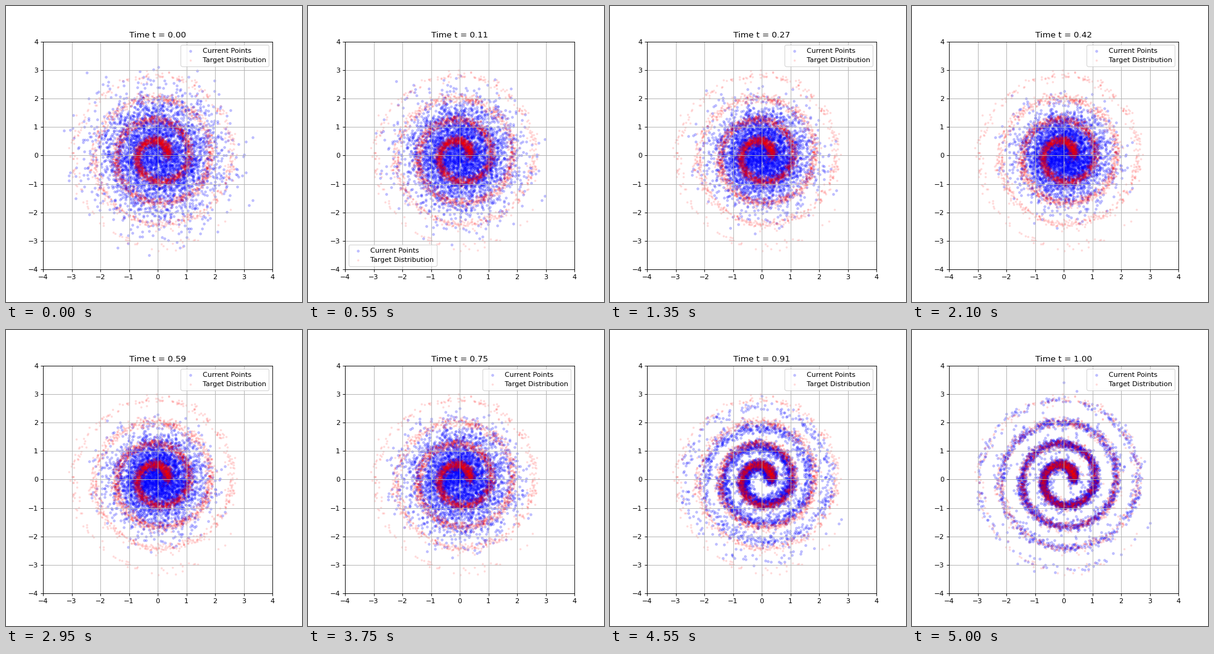
Animation of 480 by 480 pixels, one loop 5.05 s. Source, as a matplotlib script:

```python
import numpy as np
import matplotlib.pyplot as plt
from matplotlib.animation import FuncAnimation

N = 4000
STEPS = 100
R0, PITCH, END = 0.33, 0.12, 8 * np.pi   # spiral: r = R0 + PITCH * theta
SPREAD = 0.085
rng = np.random.default_rng(7)


def spiral(theta):
    r = R0 + PITCH * theta
    return np.column_stack([r * np.cos(theta), r * np.sin(theta)])


def sample_target(n):
    theta = END * (1 - np.sqrt(rng.random(n)))
    return spiral(theta) + SPREAD * rng.normal(size=(n, 2))


def flow(x):
    """Carry the points from the normal cloud to the spiral along the mean velocity."""
    r = np.sqrt(np.linspace(R0 ** 2, (R0 + PITCH * END) ** 2, 600))
    theta = (r - R0) / PITCH
    m = spiral(theta).astype(np.float32)
    log_w = np.log((1 - theta / END).clip(1e-4) / r).astype(np.float32)
    half_sq = (m ** 2).sum(axis=1) / 2
    x = x.astype(np.float32)
    path = [x]
    for k in range(STEPS):
        t = k / STEPS
        var = (1 - t) ** 2 + (t * SPREAD) ** 2
        logit = (x @ m.T) * np.float32(t / var)
        logit += log_w - half_sq * np.float32(t * t / var)
        logit -= logit.max(axis=1, keepdims=True)
        w = np.exp(logit)
        mean = (w @ m) / w.sum(axis=1, keepdims=True)
        v = mean + (t * SPREAD ** 2 - (1 - t)) / var * (x - t * mean)
        x = x + v / STEPS
        path.append(x)
    return path


target = sample_target(N)
path = flow(rng.normal(size=(N, 2)))
stray = rng.normal(scale=0.17, size=(N, 2)) * (rng.random((N, 1)) < 0.12)

fig, ax = plt.subplots(figsize=(6, 6), dpi=80)
current = ax.scatter(*path[0].T, s=10, c="blue", alpha=0.2, label="Current Points")
ax.scatter(*target.T, s=5, c="red", alpha=0.1, label="Target Distribution")
ax.set_xlim(-4, 4)
ax.set_ylim(-4, 4)
ax.grid(True)
title = ax.set_title("Time t = 0.00")
legend = ax.legend(loc="upper right")


def update(k):
    t = k / STEPS
    current.set_offsets(path[k] + t ** 8 * stray)
    title.set_text(f"Time t = {t:.2f}")
    legend.set_loc("lower left" if 0.05 <= t <= 0.15 else "upper right")
    return current, title, legend


anim = FuncAnimation(fig, update, frames=STEPS + 1, interval=50,
                     repeat=True, repeat_delay=0, blit=False)
plt.show()
```
